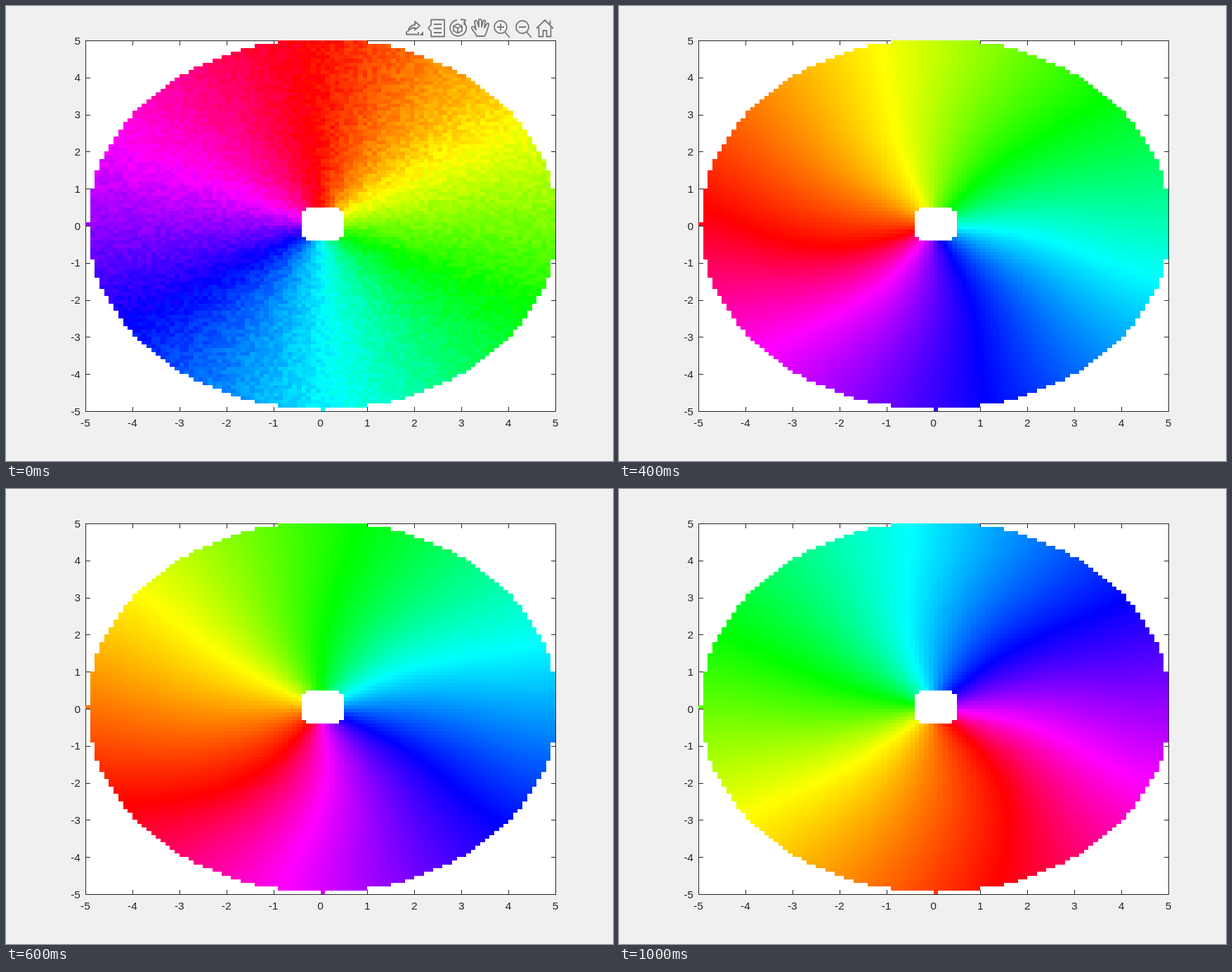
These frames come from a looping animation (864 px wide and 648 px high, 1200 ms). An HTML page with a canvas:

```html
<!DOCTYPE html>
<html lang="en">
<head>
<meta charset="utf-8">
<title>Rotating phase wave</title>
<style>
  html, body { margin: 0; width: 100%; height: 100%; overflow: hidden; background: #f0f0f0; }
  canvas, svg { position: absolute; left: 0; top: 0; }
  text { font: 15.5px "Liberation Sans", Arial, sans-serif; fill: #262626; }
  #tools { fill: none; stroke: #777; stroke-width: 1.8; stroke-linejoin: round; }
  #tools .solid { fill: #777; stroke: none; }
</style>
</head>
<body>
<canvas id="plot" width="864" height="648"></canvas>
<svg width="864" height="648">
  <g id="labels"></g>
  <g id="tools">
    <path d="M572 36C574 29 578 27 582 27V22L589 28L582 34V31C578 31 575 32 572 36ZM570 36V40.5H587V37"/>
    <path class="solid" d="M588 42H594V36Z"/>
    <path d="M605 19.5H624V43.5H605V36L601 31.5L605 27ZM609 26H620M609 32H620M609 38H620"/>
    <path d="M651 22.5A11.5 11.5 0 1 1 642 20M647 19L654 20L652 27"/>
    <path d="M643 25.5L649 28.5V35.5L643 38.5L637 35.5V28.5ZM637 28.5L643 31.5L649 28.5M643 31.5V38.5"/>
    <path d="M670 43C668 38 665 36 663 32C662 29 665 28 667 31L669 34L667 23C667 20 670 20 671 23L673 30V21C673 18 676 18 677 21V30L679 22C680 19 683 20 682 23L681 31L684 26C686 23 688 25 687 28C685 33 684 39 681 43Z"/>
    <path d="M710 37L717 45M699 30H709M704 25V35"/><circle cx="704" cy="30" r="9"/>
    <path d="M741 37L748 45M730 30H740"/><circle cx="735" cy="30" r="9"/>
    <path d="M755 32L767 20L779 32M758.5 30V43.5H764.5V35H769.5V43.5H775.5V30M774.5 26V20.5"/>
  </g>
</svg>
<script>
const ctx = document.getElementById('plot').getContext('2d');
const tools = document.getElementById('tools');
const L = 113, T = 49, W = 669, H = 528, N = 100;
const FRAMES = 6, HOLD = 200, DEG = 180 / Math.PI;
const px = i => Math.round(L + (i + 50) * W / N);
const py = j => Math.round(T + (50 - j) * H / N);

function label(text, x, y, anchor) {
  const el = document.createElementNS('http://www.w3.org/2000/svg', 'text');
  el.setAttribute('x', x);
  el.setAttribute('y', y);
  el.setAttribute('text-anchor', anchor);
  el.textContent = text;
  document.getElementById('labels').append(el);
}

for (let v = -5; v <= 5; v++) {
  label(v, L + (v + 5) * W / 10, 599, 'middle');
  label(v, 106, T + (5 - v) * H / 10 + 5.5, 'end');
}

function random(seed) {
  return () => (seed = (seed * 16807) % 2147483647) / 2147483647;
}

// The disc has a small hole; each cell belongs to its lower-left corner.
function inside(i, j) {
  const d = i * i + j * j;
  const hole = Math.max(Math.abs(i), Math.abs(j)) < 5 && d < 32;
  return d <= 2500 && !hole;
}

// Spiral twist and an uneven spread of hues, both fading towards the rim.
function spiralHue(angle, r, step) {
  const s = (1 + Math.cos(Math.PI * Math.min(1, Math.max(0, (r - 0.5) / 4.5)))) / 2;
  const red = 10 + 16 * Math.sqrt(s);
  const stops = [-red, 60 + 3.5 * s, 120 + 2 * s, 180 - 1.5 * s, 240, 300 - 5 * s, 360 - red];
  const turn = 126 + 37.5 * (step - 1) + 11 * s - angle;
  const d = ((turn + red) % 360 + 360) % 360 - red;
  let k = 0;
  while (k < 5 && d >= stops[k + 1]) k++;
  return 60 * (k + (d - stops[k]) / (stops[k + 1] - stops[k]));
}

function drawAxes() {
  ctx.fillStyle = '#f0f0f0';
  ctx.fillRect(0, 0, 864, 648);
  ctx.fillStyle = '#fff';
  ctx.fillRect(L, T, W, H);
  ctx.strokeStyle = '#262626';
  ctx.strokeRect(L + 0.5, T + 0.5, W, H);
  ctx.beginPath();
  for (let v = -40; v <= 40; v += 10) {
    const x = px(v) + 0.5, y = py(v) + 0.5;
    for (const [y0, dy] of [[T, 7], [T + H, -6]]) { ctx.moveTo(x, y0); ctx.lineTo(x, y0 + dy); }
    for (const [x0, dx] of [[L, 7], [L + W, -6]]) { ctx.moveTo(x0, y); ctx.lineTo(x0 + dx, y); }
  }
  ctx.stroke();
}

function draw(step) {
  const rnd = random(4711);
  drawAxes();
  for (let j = -50; j < 50; j++) {
    for (let i = -50; i < 50; i++) {
      if (!inside(i, j)) continue;
      const x = (i + 0.5) / 10, y = (j + 0.5) / 10;
      const angle = Math.atan2(y, x) * DEG;
      const hue = step ? spiralHue(angle, Math.hypot(x, y), step)
                       : 93 - angle + (rnd() - 0.5) * 11;
      ctx.fillStyle = `hsl(${hue.toFixed(2)} 100% 50%)`;
      ctx.fillRect(px(i), py(j + 1), px(i + 1) - px(i), py(j) - py(j + 1));
    }
  }
  tools.style.display = step ? 'none' : '';
}

let shown = -1;
function tick() {
  const step = Math.floor(performance.now() / HOLD) % FRAMES;
  if (step !== shown) draw(shown = step);
  requestAnimationFrame(tick);
}
tick();
</script>
</body>
</html>
```
